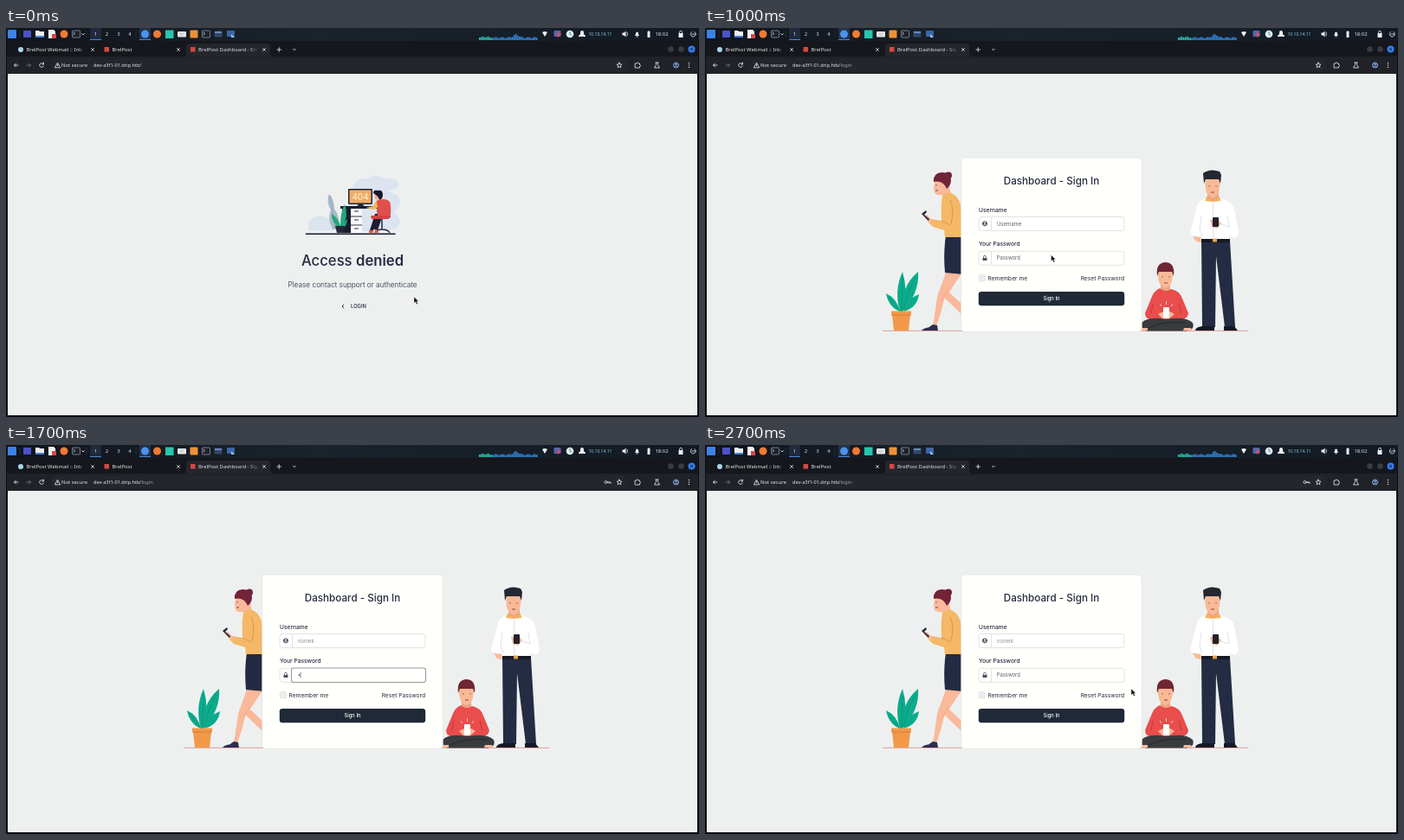
Animation of 800x450 px, one loop 2800 ms. Source, as an HTML page:

```html
<!DOCTYPE html>
<html lang="en">
<head>
<meta charset="utf-8">
<title>Dashboard sign in</title>
<style>
html, body { margin: 0; width: 100%; height: 100%; overflow: hidden; background: #0b0d12 }
svg { display: block; width: 800px; height: 450px }
.ui { font: 5.9px "Noto Sans", sans-serif; fill: #e3e5e8 }
.page { font: 6.67px Inter, sans-serif; fill: #262b40 }
.small { font-size: 5.83px }
.mid { text-anchor: middle }
.line { fill: none; stroke: #d9dbdf; stroke-width: .9; stroke-linecap: round; stroke-linejoin: round }
.box { fill: #fffffd; stroke: #d5d7dc; stroke-width: .7 }
.focus { fill: #fffffd; stroke: #999b9f; stroke-width: 1.1 }
.skin { fill: #f9b99a }
</style>
</head>
<body>
<svg viewBox="0 0 800 450">
<defs>
  <linearGradient id="panel"><stop stop-color="#10141c"/><stop offset=".45" stop-color="#1a232c"/><stop offset="1" stop-color="#121922"/></linearGradient>
  <linearGradient id="fadeTab"><stop stop-color="#24262c" stop-opacity="0"/><stop offset="1" stop-color="#24262c"/></linearGradient>
  <linearGradient id="fadeStrip"><stop stop-color="#15171c" stop-opacity="0"/><stop offset="1" stop-color="#15171c"/></linearGradient>
  <path id="x" d="M-1.5-1.5l3 3m0-3l-3 3"/>
</defs>

<!-- desktop panel -->
<rect width="800" height="15" fill="url(#panel)"/>
<rect x="97" width="13" height="14" fill="#202a3c"/><rect x="97" y="13" width="13" height="1" fill="#4c83d8"/>
<rect x="154" width="13" height="14" fill="#263247"/><rect x="154" y="13" width="13" height="1" fill="#4c83d8"/>
<rect x="2" y="2" width="10" height="10" rx="1" fill="#3c82e8"/>
<path d="M16 3v8M93 3v8M150 3v8" stroke="#343b48" stroke-width=".6"/>
<rect x="20" y="3" width="9" height="8" rx="1" fill="#4d52c9"/>
<path d="M34 3h4l1 1h5v7H34z" fill="#e9edf5"/><path d="M34 9h10v2H34z" fill="#4780d8"/>
<path d="M49 2h6l2 2v8h-8z" fill="#f2f2f2"/><path d="M53 7h5v5h-5z" fill="#d8474d"/>
<circle cx="67" cy="7" r="4.5" fill="#f47a32"/>
<g fill="#1d222b" stroke="#9da5b2" stroke-width=".7"><rect x="76.5" y="3" width="9" height="8" rx="1"/><rect x="226.5" y="3" width="9" height="8" rx="1"/></g>
<path class="line" d="M78 5l1.500 1.500L78 8M228 5l1.500 1.500L228 8M87.500 6.500l1.500 1.500 1.500-1.500"/>
<g class="ui mid"><text x="103.5" y="9.3">1</text><text x="116.5" y="9.3">2</text><text x="130" y="9.3">3</text><text x="143" y="9.3">4</text></g>
<circle cx="160.5" cy="7" r="4.5" fill="#4e92ee"/>
<circle cx="174.5" cy="7" r="4.5" fill="#f47a32"/>
<rect x="184" y="2.5" width="9.5" height="9.5" fill="#27c5ae"/>
<rect x="198" y="4" width="10" height="6.5" rx="1" fill="#e8e9eb"/><path d="M200 8h5M200 6h6" stroke="#a9adb4" stroke-width=".6"/>
<rect x="212.5" y="2.5" width="9" height="9" rx="1" fill="#ef9235"/>
<rect x="240.5" y="3.5" width="9" height="7" rx="1" fill="#344769"/><path d="M241 4h8v2h-8z" fill="#6888b7"/>
<rect x="255" y="3" width="9" height="7" rx="1" fill="#3b68a8"/><path d="M260 7l4 4h-4z" fill="#9fc2ef"/>
<g id="graph"></g>
<path d="M619 5q3-2 6 0l-3 5z" fill="#edf0f3"/>
<rect x="632.5" y="3" width="8" height="7" rx="1" fill="#5368ad"/><path d="M636 5l5 2-4 4z" fill="#da4c62"/>
<circle cx="651" cy="7" r="4.3" fill="#e2eee8"/><path d="M651 4v3l2 1.500" fill="none" stroke="#3b8cca"/>
<path d="M663 5a2 2 0 0 1 4 0v2l2 2v1h-8V9l2-2z" fill="#e9ebed"/>
<text class="ui" x="672.5" y="8.8" style="font-size:5px;fill:#8fcdf0">10.10.14.11</text>
<path d="M711.500 5.500h2l2-2v7l-2-2h-2zM726 9q1-1 1-3a1.500 1.500 0 0 1 3 0q0 2 1 3zM727.500 9.500h2v1h-2zM740.500 4h1V3h1v1h1v7h-3zM776.500 6h5v5h-5z" fill="#eceef0"/>
<path class="line" d="M717 5q1 2 0 4M777.500 6V4.800a1.500 1.500 0 0 1 3 0V6M795 4.500a3 3 0 1 1-3.500 0M792 7h4"/>
<text class="ui" x="749.5" y="9.2">18:02</text>

<!-- browser -->
<rect x="1" y="15" width="798" height="19" fill="#15171c"/>
<rect x="1" y="33" width="798" height="20" fill="#202228"/>
<path d="M205 33q3 0 3-3v-8q0-4 4-4h89q4 0 4 4v8q0 3 3 3z" fill="#24262c"/>
<rect x="52" y="35.5" width="666" height="15" rx="7.5" fill="#24262d"/>
<circle cx="17" cy="25" r="3" fill="#a9d5ea"/>
<rect x="113.5" y="22" width="5.5" height="5.5" fill="#d64842"/>
<g class="ui">
  <text x="23.5" y="27.2">BrelPost Webmail :: Inb</text>
  <text x="122.5" y="27.2">BrelPost</text>
  <text id="title" x="222" y="27.2"></text>
  <text x="64" y="45.1">Not secure</text>
  <text x="101" y="45.1" style="font-size:5.6px">dev-a3f1-01.drip.htb/<tspan id="path" fill="#9b9fa6"></tspan></text>
</g>
<rect x="82" y="19" width="12" height="12" fill="url(#fadeStrip)"/>
<rect x="280" y="19" width="12" height="12" fill="url(#fadeTab)"/>
<rect id="favicon"/>
<path id="spinner" class="line" d="M216 22.500a3 3 0 0 1 1 5"/>
<g class="line">
  <use href="#x" x="100" y="25"/><use href="#x" x="199" y="25"/><use href="#x" x="298" y="25"/>
  <path d="M313 25h4.500m-2.250-2.250v4.500M331.500 24.200l1.500 1.500 1.500-1.500"/>
  <path d="M14 43H9.500m2-2l-2 2 2 2"/>
  <path d="M24 43h4.500m-2-2l2 2-2 2" stroke="#70747b"/>
  <path id="reload" d="M43.300 41.500a2.500 2.500 0 1 0 .2 2.500M43.500 40v2h-2"/>
  <use id="stop" href="#x" x="41" y="43"/>
  <path d="M56.500 45.500l3-5.300 3 5.300zM59.500 42v1.500"/>
  <g id="key"><circle cx="692.5" cy="43" r="1.5"/><path d="M694 43h4v1.500M696 43v1"/></g>
  <path d="M708 40l.9 2 2.100.2-1.600 1.400.5 2.100-1.900-1.100-1.900 1.100.5-2.100-1.600-1.400 2.100-.2zM726.500 41h1.500a1 1 0 0 1 2 0h1.500v1.500a1 1 0 0 1 0 2V46h-5zM750 40h3M750.500 40v2.500l-2 3.500h6l-2-3.500V40"/>
  <g stroke="#91b8f5"><circle cx="773.5" cy="43" r="3"/><circle cx="773.5" cy="42" r="1"/><path d="M771.500 45q2-2 4 0"/></g>
</g>
<g fill="#e3e5e8"><circle cx="788.5" cy="40.5" r=".7"/><circle cx="788.5" cy="43" r=".7"/><circle cx="788.5" cy="45.5" r=".7"/></g>
<circle cx="767.5" cy="24.5" r="3.3" fill="#393c44"/><circle cx="779.5" cy="24.5" r="3.3" fill="#393c44"/>
<circle cx="791.5" cy="24.5" r="4" fill="#347cf0"/><use href="#x" x="791.5" y="24.5" stroke="#10151e" stroke-width=".8"/>
<rect x="2" y="53" width="796" height="395" fill="#eef0f0"/>

<!-- access denied -->
<g id="denied">
  <path d="M350 235q-5-13 8-17 16-3 20 16zM403 179q4-7 14-4 8-8 20-1 16-2 17 8-2 6-15 5l12 6q9 10-2 18l6 12q0 12-20 12h-28q-18-30-4-56z" fill="#dce4ef"/>
  <path d="M377 233q-7-14-2-22-6-11-2-19 6 6 6 17 8 10 4 24z" fill="#a9bccb"/><path d="M374 194l6 38" stroke="#8297aa" stroke-width=".6"/>
  <path d="M386 206h44v3h-44zM388 208h10v29h-10z" fill="#1b1c2d"/>
  <path d="M385 232q-10-8-9-17 8 5 10 14 0-17 5-25 5 13-2 25 3-7 5-8 0 7-6 12z" fill="#24a77c"/>
  <path d="M380 229h11l-2 8h-7z" fill="#25283a"/>
  <path d="M398 209h13v28h-13z" fill="#f9f9f9"/><path d="M398 218h13M398 228h13M402 212h5M402 222h5M402 232h5" stroke="#1b1c2d" stroke-width=".9"/>
  <rect x="395" y="186" width="28" height="18" rx="1" fill="#222438"/><rect x="396.5" y="187.5" width="25" height="15" fill="#efad65"/>
  <text x="409" y="198.5" class="mid" style="font:10px Inter,sans-serif;fill:#fff4dc">404</text>
  <path d="M407 204h5l2 3h-10z" fill="#222438"/>
  <path d="M429 197l-5 9-9 2 10 2 7-4z" fill="#f3b44e"/><path d="M425 190h8v8h-7z" fill="#efb093"/>
  <path d="M424 191q0-4 5-3 6-1 6 5 0 5-4 6-1-5-7-8z" fill="#16182a"/>
  <path d="M442 214l-16 1-6 19h4l7-14 13-1zM428 219l-3 14 4 1 5-15z" fill="#1b1d31"/>
  <path d="M428 200q8-4 14 0 3 2 2 17h-15q-2-8 0-10z" fill="#df504d"/><path d="M421 217h22q1 4-3 4h-18z" fill="#d63f44"/>
  <path d="M434 221v12m-8 4q1-4 8-4t9 4" fill="none" stroke="#272a40" stroke-width="1.5"/>
  <path d="M419 234h5v3h-5zM426 233l4 1v3h-4z" fill="#e35a40"/>
  <path d="M346.500 238.200h102.500" stroke="#15172a" stroke-width="1.5" stroke-linecap="round"/>
  <g class="page mid">
    <text x="400" y="275.2" style="font-size:16.67px;font-weight:500">Access <tspan font-weight="600">denied</tspan></text>
    <text x="400" y="299.9" style="font-size:8.33px;font-weight:300">Please contact support or authenticate</text>
    <rect id="hover" x="376.5" y="313.3" width="47" height="17.5" rx="3" fill="#f3f4f3" stroke="#a7a9ad" stroke-width=".8"/>
    <text class="small" x="407" y="324.2" font-weight="500">LOGIN</text>
  </g>
  <path d="M390 320l-2 2 2 2" fill="none" stroke="#262b40"/>
</g>

<!-- sign in -->
<g id="login">
  <g id="art">
    <path d="M205 350.300h422" stroke="#d9897e" stroke-width=".8"/>
    <!-- plant -->
    <path d="M225 328q-13-5-16-21 13 6 16 21zM225 328q-7-24 3-46 7 22 0 46zM228 328q-3-28 18-46 2 24-18 46zM229 328q4-15 18-20-2 16-18 20z" fill="#0cab8c"/>
    <path d="M212 311l12 16M228 288l-1 38M243 288q-10 18-14 38" fill="none" stroke="#078471" stroke-width=".5"/>
    <path d="M215 327.500h23v5h-23zM216 332h21l-2 18h-17z" fill="#f29949"/><path d="M216 332h21" stroke="#d9793a"/>

    <!-- walker -->
    <path class="skin" d="M269 305l28 27v-12l-17-16z"/>
    <path class="skin" d="M278 283l-10 28q-2 15-5 34h4q6-16 9-31l21-31z"/>
    <path d="M281 303l-7 11" stroke="#e89a80" stroke-width=".6"/>
    <path d="M263 343l5 1 1 6h-19q2-3 8-3.500z" fill="#2d2c50"/>
    <path d="M278 240h20v45l-21-2q-2-22 1-43z" fill="#222b42"/>
    <path class="skin" d="M266 176l-2 8 1 7q3 3 9 2v5h11l-3-15-6-9z"/>
    <circle cx="281" cy="170.5" r="4" fill="#722338"/>
    <path d="M264 178q-1-10 9-11 11 0 11 9 0 6-5 10-3-7-8-8-4-1-7 0z" fill="#722338"/>
    <path d="M267 181v1.500M266 188h3" stroke="#722338" stroke-width=".8"/>
    <path d="M274 194q4-4 10-3 11 4 12 21v30h-19l-1-8-13-4-5-5 3-4 12 2q-1-18 1-29z" fill="#f4b867"/>
    <path d="M273 223l10 5M283 199q5 10 1 28" fill="none" stroke="#cf8a42" stroke-width=".7"/>
    <path class="skin" d="M262 222l-6-6-4 1 6 8 3 1z"/><path d="M250 215l5-4 1 2-3 3 6 5-1 2z" fill="#25283e"/>

    <!-- standing man -->
    <path d="M573 246h33l6 100h-12l-10-82-1 82h-15z" fill="#232c43"/>
    <path d="M566 350q0-4 8-5h14v5zM599 345h12l4 5h-16z" fill="#161925"/>
    <path d="M580 186h13v14h-13z" fill="#eca57f"/>
    <path d="M578 197l8 4 9-4 10 4q5 2 7 14l4 22q-1 6-6 5l-5-2v4h-32v-4l-2 1-9-1q-3-2-1-7l7-27q2-7 10-9z" fill="#fff"/>
    <path d="M573 217l-2 16 3 7M603 217l2 13-12-4M586.500 202v41" fill="none" stroke="#d5d9df" stroke-width=".8"/>
    <path d="M577.500 178q-1 16 8.500 18.500 8-1 8.500-17.500l-2-7h-13z" fill="#f8b996"/>
    <path d="M576 180l-1-12q8-6 19-2l2 4-1 10-2-5h-15z" fill="#242630"/>
    <path d="M582 182v1.500M590 182v1.500M584 190h4" stroke="#5b3430" stroke-width=".8"/>
    <path d="M579 195l7 5 8-5 1.500 5-9.500 1-9-1z" fill="#f4b35a"/>
    <path d="M583 222l9-1 4 5-5 6-6-2z" fill="#f8b996"/><rect x="586" y="219" width="7" height="11" rx="1" fill="#20232e"/>
    <path d="M573 244h33v4h-33z" fill="#171a25"/><path d="M586 243.500h5v4h-5z" fill="#e7a34d"/>
    <path class="skin" d="M563 241l9 1 1 6-6-1z"/>

    <!-- sitting boy -->
    <path d="M526 294h11v11h-11z" fill="#eca57f"/>
    <path d="M523 281q-1 18 8.500 20 9-2 8.500-20z" fill="#f8b996"/>
    <path d="M522 287q-2-15 9-16 12 0 10 16l-2-5h-15z" fill="#702633"/>
    <path d="M528 287v1.500M536 287v1.500M530 295h4" stroke="#702633" stroke-width=".8"/>
    <path d="M525 301q6 6 13 1 10 2 13 11l7 17q-1 7-8 7h-35q-7 0-7-7l7-17q3-9 10-12z" fill="#e94d4c"/>
    <path d="M517 319l-2 11M547 319l3 11" stroke="#b83238" stroke-width=".8"/>
    <path d="M504 341q8-8 28-4 23-4 31 4 3 8-7 9.500h-46q-9-1-6-9.500z" fill="#393b3f"/>
    <path d="M512 347q20-9 43-6" fill="none" stroke="#222428" stroke-width=".8"/>
    <path d="M523 331l6-3h8l5 3-6 5h-8z" fill="#f8b996"/><rect x="529" y="323" width="7" height="13" rx="1" fill="#fff"/>
    <path d="M527 322l-2-3M532.500 320v-4M538 322l2-3" stroke="#ffe4d8" stroke-width=".8"/>
    <path class="skin" d="M504 347h7v3h-7zM553 347h8l1 3h-10z"/>
  </g>
  <rect x="295.7" y="150" width="208.6" height="201.3" rx="4" fill="#fffffb" stroke="#dfe1e3" stroke-width=".7"/>
  <rect class="box" x="316" y="218.5" width="168" height="16" rx="3"/><path d="M330.500 219v15" stroke="#d5d7dc" stroke-width=".7"/>
  <rect class="box" x="316" y="258.3" width="168" height="16" rx="3"/><path d="M330.500 259v15" stroke="#d5d7dc" stroke-width=".7"/>
  <rect id="nameFocus" class="focus" x="330.3" y="218.3" width="154" height="16.5" rx="2.5"/>
  <rect id="passFocus" class="focus" x="329.5" y="258" width="155" height="16.5" rx="2.5"/>
  <circle cx="323" cy="226.3" r="2.9" fill="#4b5060"/><circle cx="323" cy="225.4" r="1" fill="#fff"/><path d="M321.300 228q1.700-1.600 3.400 0" stroke="#fff" fill="none" stroke-width=".8"/>
  <path d="M320.500 266h5v3h-5z" fill="#4b5060"/><path d="M321.500 266v-1.300a1.400 1.400 0 0 1 2.800 0V266" fill="none" stroke="#4b5060" stroke-width=".8"/>
  <rect x="316.3" y="285.8" width="7" height="7" rx="1.3" fill="#eceef0" stroke="#d3d6db" stroke-width=".6"/>
  <rect x="315.8" y="305" width="168.4" height="16.3" rx="3.3" fill="#1f2937"/>
  <g class="page">
    <text class="mid" x="400" y="181.2" style="font-size:11.67px;font-weight:500">Dashboard - Sign In</text>
    <text x="316" y="212.6" font-weight="500">Username</text>
    <text x="316" y="252.2" font-weight="500">Your Password</text>
    <text x="326.5" y="291.6">Remember me</text>
    <text x="484" y="291.6" text-anchor="end">Reset Password</text>
    <text id="user" class="small" x="337" y="228.6"></text>
    <text id="pass" class="small" x="336.8" y="268.4" fill="#5a5f6c"></text>
    <text class="small mid" x="400" y="315.3" fill="#fff" font-weight="500">Sign In</text>
  </g>
  <path id="caret" stroke="#222" stroke-width=".6"/>
  <g id="menu" class="ui">
    <path d="M375.500 239l4.500-5 4.500 5z" fill="#191c22"/><rect x="371.3" y="238" width="65" height="93.5" rx="2.5" fill="#191c22"/>
    <rect id="choice" x="371.3" y="240.5" width="65" height="15" fill="#343840"/>
    <g id="names" style="font-size:6.2px"></g>
  </g>
</g>

<g id="status"><path d="M1 438h76q2.500 0 2.500 2.500V448H1z" fill="#17191e"/><text class="ui" x="4" y="445.1">dev-a3f1-01.drip.htb/login</text></g>
<g id="pointer">
  <path id="arrow" d="M0 0v7.300l1.700-1.500 1.300 2.900 1.400-.6-1.300-2.800h2.300z" fill="#111" stroke="#fff" stroke-width=".4"/>
  <path id="beam" d="M-1.500-4h3M0-4v8M-1.500 4h3" stroke="#222" stroke-width=".8"/>
</g>
</svg>
<script>
const $ = id => document.getElementById(id);
const show = (id, on) => $(id).style.display = on ? "" : "none";
const set = (id, attrs) => { for (const k in attrs) $(id).setAttribute(k, attrs[k]); };
const LOOP = 2800, STEP = 100;
const users = ["nomek", "dorvel", "test", "admin", "fractalkalkule", "nomek1"];

$("names").innerHTML = users.map((n, i) => `<text x="376.3" y="${250 + i * 15}">${n}</text>`).join("");
$("graph").innerHTML = Array.from({ length: 34 }, (_, i) => {
  const h = i < 7 ? 3 + i % 3 * .6 : 2 + 1.6 * Math.abs(Math.sin(i * 2.3)) + 3.5 * Math.exp(-(((i - 21) / 2) ** 2));
  return `<rect x="${546 + i * 2}" y="${14 - h}" width="1.5" height="${h}" fill="${i < 8 ? "#28c9b4" : "#3187df"}"/>`;
}).join("");

// time, x, y
const route = [
  [0, 471, 311], [300, 403, 324], [400, 402, 324], [600, 402, 324], [700, 404, 322], [900, 403, 300],
  [1100, 396, 225], [1200, 396, 225], [1300, 389, 247], [1500, 385, 266], [2000, 392, 258],
  [2200, 411, 212], [2700, 492, 282], [LOOP, 492, 282]
];

function pointerAt(t) {
  const i = route.findIndex(p => p[0] > t), [t0, x0, y0] = route[i - 1], [t1, x1, y1] = route[i];
  const u = (t - t0) / (t1 - t0), e = u * u * (3 - 2 * u);
  return [x0 + (x1 - x0) * e, y0 + (y1 - y0) * e];
}

function render(t) {
  const within = (a, b) => t >= a && t < b;
  const login = t >= 600, filled = t >= 1400;
  const loading = within(400, 900) || within(1900, 2200);
  const nameFocus = within(1100, 1500), passFocus = within(1500, 2000);
  const dots = passFocus ? [0, 0, 1, 4, 8][(t - 1500) / STEP] : 0;

  show("denied", !login);
  show("login", login);
  show("hover", within(300, 600));
  show("status", within(300, 600));
  show("art", t >= 900);
  show("reload", !loading);
  show("stop", loading);
  show("key", filled);
  $("title").textContent = "BrelPost Dashboard - " + (login ? "Sig" : "Err");
  $("path").textContent = login ? "login" : "";

  const small = within(2000, 2300), gray = within(600, 900);
  show("favicon", !within(400, 600));
  show("spinner", within(400, 600));
  set("favicon", {
    x: small ? 214.5 : 213, y: small ? 23 : 22, width: small ? 3.5 : 5.5, height: small ? 4 : 5.5,
    fill: gray ? "#777d86" : "#d64842"
  });

  show("nameFocus", nameFocus);
  show("passFocus", passFocus);
  show("menu", within(1200, 1400));
  show("choice", t === 1300);
  $("user").textContent = filled ? users[0] : "Username";
  set("user", { fill: filled ? "#8d9199" : "#5a5f6c" });
  $("pass").textContent = passFocus && t > 1600 ? "•".repeat(dots) : "Password";
  show("caret", nameFocus || passFocus);
  const caretX = 337 + (passFocus ? dots * 3 : filled ? 19 : 0);
  set("caret", { d: `M${caretX} ${passFocus ? 263 : 223}v6.5` });

  const overInput = within(1100, 1300) || within(1500, 1600);
  show("pointer", !within(1600, 2100));
  show("arrow", !overInput);
  show("beam", overInput);
  set("pointer", { transform: `translate(${pointerAt(t)})` });
}

function tick() {
  render(Math.floor(performance.now() % LOOP / STEP) * STEP);
  requestAnimationFrame(tick);
}
tick();
</script>
</body>
</html>
```
